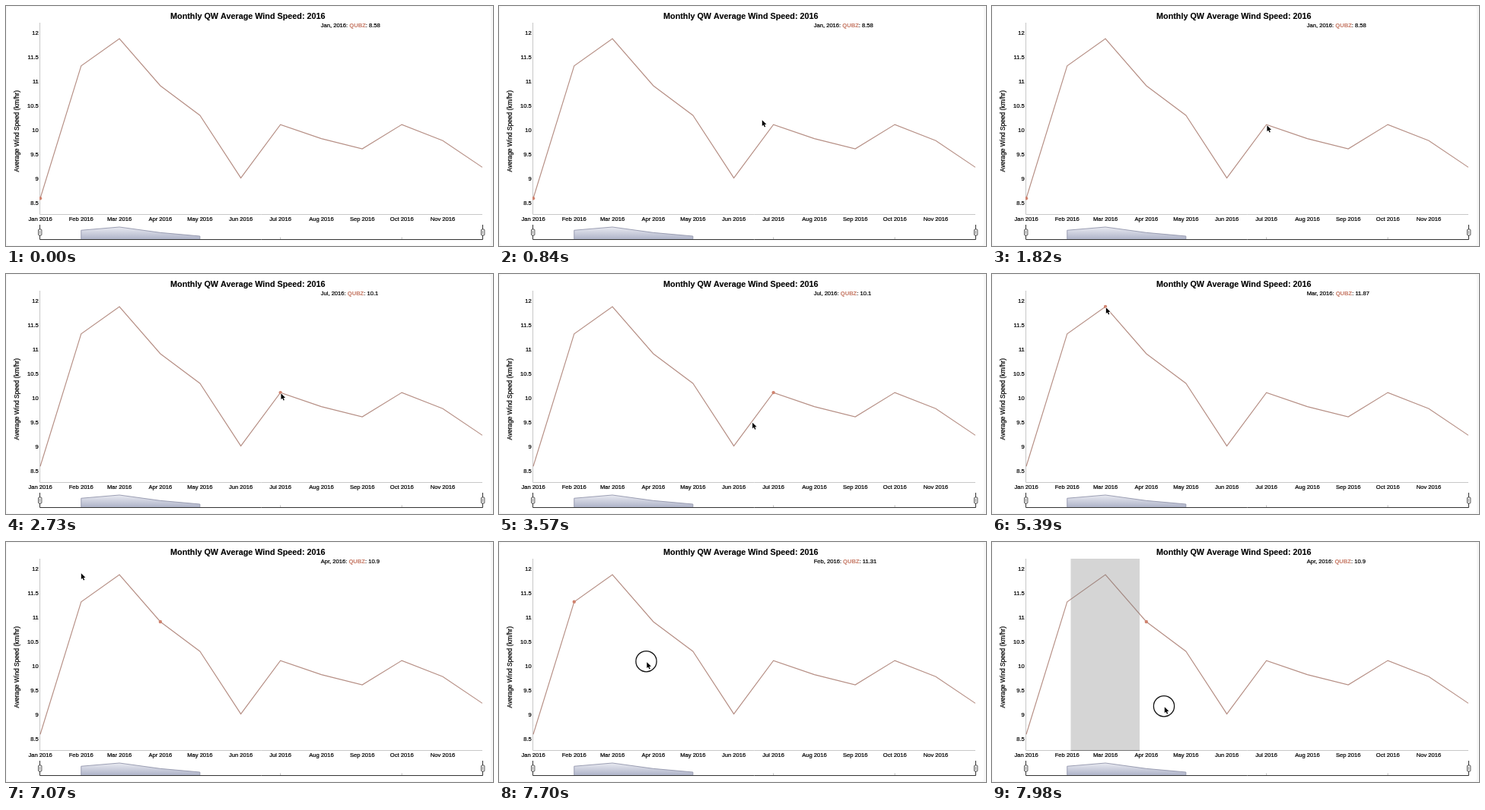
Animation of 640 by 316 pixels, one loop 8000 ms. Source, as an HTML page with a canvas:

```html
<!DOCTYPE html>
<html lang="en">
<head>
<meta charset="utf-8">
<title>Monthly Average Wind Speed</title>
<style>
html, body { margin: 0; width: 100%; height: 100%; overflow: hidden; background: #fff; }
canvas { display: block; width: 640px; height: 316px; }
</style>
</head>
<body>
<canvas id="stage" width="640" height="316"></canvas>
<script>
const ctx = document.getElementById('stage').getContext('2d');
const LOOP = 8000, STEP = 70, LAG = 280;
const FOCUS = 2100, REACT = 2520, PRESS = 7420, PRESS_X = 104;
const LEFT = 45, RIGHT = 626, TOP = 22, BOTTOM = 274;
const FONT = '"Liberation Sans", Arial, sans-serif';
const SERIES = 'QUBZ';

const months = 'Jan Feb Mar Apr May Jun Jul Aug Sep Oct Nov Dec'.split(' ');
const values = [8.58, 11.31, 11.87, 10.9, 10.29, 9, 10.1, 9.81, 9.6, 10.1, 9.77, 9.22];

// Months sit on a day scale from 1 January to 1 December
const dayOf = m => (Date.UTC(2016, m) - Date.UTC(2016, 0)) / 864e5;
const xOf = m => LEFT + (RIGHT - LEFT) * dayOf(m) / dayOf(11);
const yOf = v => 34.7 + (12 - v) * 63.9;
const pointAt = name => {
  const m = months.indexOf(name);
  return [xOf(m), yOf(values[m])];
};

// Pointer moves: start time, end time, destination
const entry = [482, 28];
const moves = [
  [70, 840, 345, 149],
  [840, 1190, ...pointAt('Jul')],
  [3220, 3880, ...pointAt('Jun')],
  [4060, 4690, 185, 88],
  [4760, 5390, ...pointAt('Mar')],
  [6440, 6760, 187, 148],
  [6760, 7070, 98, 40],
  [7210, PRESS, PRESS_X, 50],
  [PRESS, 7700, 193.5, 157],
  [7700, 7980, 226, 216]
];

function pointer(t) {
  let [x, y] = entry;
  for (const [from, to, tx, ty] of moves) {
    const k = Math.max(0, Math.min(1, (t - from) / (to - from)));
    const e = k * k * (3 - 2 * k);
    x += (tx - x) * e;
    y += (ty - y) * e;
  }
  return { x, y };
}

// The chart reacts to the pointer late, and only once it has focus
function activeMonth(t) {
  if (t < REACT) return 0;
  const { x } = pointer(t - LAG);
  const gap = m => Math.abs(xOf(m) - x);
  return months.reduce((best, _, m) => gap(m) < gap(best) ? m : best, 0);
}

// A hairline stroke gives the text its slightly heavier weight
function text(str, x, y, size, align = 'left', bold = false, color = '#000') {
  ctx.font = `${bold ? 'bold ' : ''}${size}px ${FONT}`;
  ctx.textAlign = align;
  ctx.fillStyle = ctx.strokeStyle = color;
  ctx.lineWidth = bold ? 0.1 : 0.22;
  ctx.fillText(str, x, y);
  ctx.strokeText(str, x, y);
  return ctx.measureText(str).width;
}

function trace(points) {
  ctx.beginPath();
  points.forEach(([x, y]) => ctx.lineTo(x, y));
}

function stroke(points, color, width = 1) {
  trace(points);
  ctx.strokeStyle = color;
  ctx.lineWidth = width;
  ctx.stroke();
}

function drawAxes() {
  stroke([[44.5, TOP], [44.5, 274.5], [RIGHT, 274.5]], '#c8c8c8');
  for (let v = 8.5; v <= 12; v += 0.5) text(String(v), 42.8, yOf(v) + 3.6, 7.6, 'right');
  months.slice(0, 11).forEach((m, i) => text(m + ' 2016', xOf(i), 283.1, 7.6, 'center'));
  text('Monthly QW Average Wind Speed: 2016', 317.8, 16.8, 10.8, 'center', true);
  ctx.save();
  ctx.translate(17.3, 164.8);
  ctx.rotate(-Math.PI / 2);
  text('Average Wind Speed (km/hr)', 0, 0, 8.35, 'center');
  ctx.restore();
}

function drawSeries(active) {
  ctx.save();
  ctx.beginPath();
  ctx.rect(44, TOP, RIGHT - 44, BOTTOM - TOP);
  ctx.clip();
  stroke(months.map(pointAt), '#b68f85', 1.15);
  ctx.beginPath();
  ctx.arc(...pointAt(months[active]), 2.2, 0, 7);
  ctx.fillStyle = '#d0836f';
  ctx.fill();
  ctx.restore();
}

function drawLegend(active) {
  const y = 28.4;
  let x = 413.7;
  x += text(months[active] + ', 2016: ', x, y, 7.6);
  x += text(SERIES, x, y, 7.6, 'left', true, '#c9806e');
  text(': ' + values[active], x, y, 7.6);
}

function drawRange() {
  const ridge = [1, 2, 3, 4].map(m => [xOf(m), 291 + (11.87 - values[m]) * 7.6]);
  const area = [[xOf(1), 307], ...ridge, [xOf(4), 307]];
  const fill = ctx.createLinearGradient(0, 289, 0, 307);
  fill.addColorStop(0, '#f0f1f6');
  fill.addColorStop(1, '#afb4c9');
  trace(area);
  ctx.fillStyle = fill;
  ctx.fill();
  stroke(area, '#9296ac', 0.9);
  for (const m of [6, 9]) stroke([[xOf(m), 304.5], [xOf(m), 307]], '#aaa', 0.8);
  stroke([[44.5, 288], [44.5, 307.5], [626.5, 307.5], [626.5, 288]], '#333');
  for (const x of [44.5, 626.5]) {
    ctx.beginPath();
    ctx.roundRect(x - 2, 294, 4.4, 8, 1);
    ctx.fillStyle = '#eee';
    ctx.fill();
    ctx.strokeStyle = '#444';
    ctx.lineWidth = 0.9;
    ctx.stroke();
    stroke([[x, 296], [x, 300]], '#777', 0.8);
  }
}

function drawSelection(t) {
  if (t - LAG <= PRESS) return;
  const x = PRESS_X - 0.5, w = pointer(t - LAG).x + 1 - PRESS_X;
  ctx.fillStyle = 'rgba(128,128,128,0.33)';
  ctx.fillRect(x, TOP, w, BOTTOM - TOP);
  stroke([[x, 274.5], [x + w, 274.5]], '#777');
}

function drawPointer(t) {
  if (t < STEP) return;
  const { x, y } = pointer(t);
  if (t >= PRESS || t === FOCUS) {
    ctx.beginPath();
    ctx.arc(x, y + 0.2, 13.6, 0, 7);
    ctx.strokeStyle = '#111';
    ctx.lineWidth = 1.3;
    ctx.stroke();
  }
  ctx.save();
  ctx.translate(x + 0.8, y + 1.2);
  ctx.scale(0.85, 0.85);
  trace([[0, 0], [0, 9.2], [2.1, 7.3], [3.7, 10.8], [5.2, 10.1], [3.7, 6.7], [6.6, 6.6]]);
  ctx.closePath();
  ctx.lineJoin = 'round';
  ctx.strokeStyle = '#fff';
  ctx.lineWidth = 1.4;
  ctx.stroke();
  ctx.fillStyle = '#000';
  ctx.fill();
  ctx.restore();
}

function draw(now) {
  const t = Math.floor((now % LOOP) / STEP) * STEP;
  const active = activeMonth(t);
  ctx.fillStyle = '#f7f7f7';
  ctx.fillRect(0, 0, 640, 316);
  ctx.beginPath();
  ctx.roundRect(1, 1, 636, 314, 4);
  ctx.fillStyle = '#fff';
  ctx.fill();
  drawAxes();
  drawSeries(active);
  drawSelection(t);
  drawLegend(active);
  drawRange();
  drawPointer(t);
}

const start = performance.now();
function tick() {
  draw(performance.now() - start);
  requestAnimationFrame(tick);
}
tick();
</script>
</body>
</html>
```
